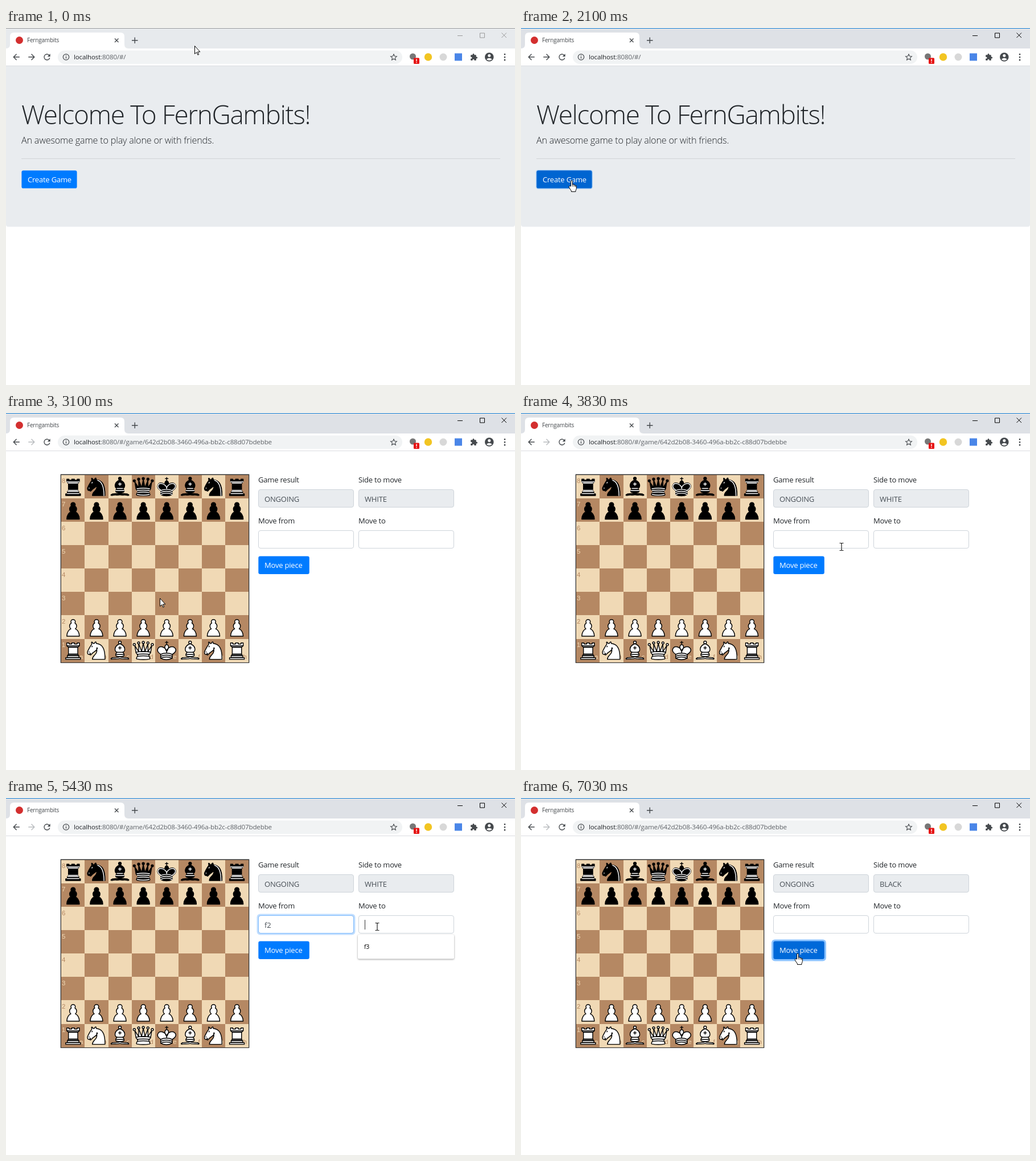
These frames come from a looping animation (894x627 px, 8000 ms). An HTML page:

```html
<!DOCTYPE html>
<html lang="en">
<head>
<meta charset="utf-8">
<title>Ferngambits</title>
<style>
html, body { margin: 0; width: 100%; height: 100%; overflow: hidden; background: #fff; }
svg { display: block; }
text { font: 13px "Open Sans", "Noto Sans", sans-serif; letter-spacing: -.2px; fill: #212529; white-space: pre; }
.light { font-weight: 300; }
.field { fill: #fff; stroke: #ced4da; }
.off { fill: #e9ecef; }
.value { fill: #495057; }
.on { fill: #fff; }
.coord { font: 11.5px "Liberation Sans", Arial, sans-serif; letter-spacing: 0; }
.drop { filter: drop-shadow(0 1px 1.5px rgba(0,0,0,.4)); }
.line { fill: none; stroke: #45494d; stroke-width: 1.4; }
</style>
</head>
<body>
<svg width="894" height="627" viewBox="0 0 894 627">
  <rect width="894" height="627" fill="#fff"/>
  <rect id="bar" width="894" height="36"/>
  <rect id="edge" width="894" height="1"/>
  <path d="M0 36q7 0 7-7V15q0-7 7-7H201q7 0 7 7V29q0 7 7 7z" fill="#fff"/>
  <circle cx="23.500" cy="21.500" r="6.500" fill="#d32f2f"/>
  <text x="37" y="25" style="font-size:10px;fill:#45494d">Ferngambits</text>
  <path class="line" d="M191 18.500l6.500 6.500m0-6.500l-6.500 6.500M221 21.700h10.500m-5.250-5.250v10.500"/>
  <path id="controls" fill="none" d="M793 13.500h9M832.500 9h8v8h-8zM870.500 8.500l8.500 8.500m0-8.500l-8.500 8.500"/>

  <g fill="#45494d">
    <path id="back" d="M20 11H7.800l5.600-5.600L12 4l-8 8 8 8 1.400-1.400L7.800 13H20z" transform="translate(9.400 42.400) scale(.72)"/>
    <path id="forward" d="M4 11H16.200l-5.600-5.600L12 4l8 8-8 8-1.400-1.400L16.200 13H4z" transform="translate(36.400 42.400) scale(.72)"/>
    <path d="M17.650 6.350A8 8 0 1 0 19.730 14h-2.080A6 6 0 1 1 12 6c1.660 0 3.140.69 4.220 1.780L13 11h7V4z" transform="translate(63.500 42.500) scale(.71)"/>
    <rect x="91" y="39.500" width="605" height="23.500" rx="11.750" fill="#f1f3f4"/>
    <path class="line" d="M100.300 51a5.200 5.200 0 1 0 10.400 0a5.200 5.200 0 1 0-10.400 0M105.500 50v3.800M105.500 47.800v1.300" style="stroke-width:1.200"/>
    <path class="line" d="M681 46l1.600 3.500 3.800.4-2.900 2.500.9 3.800-3.400-2-3.400 2 .9-3.800-2.900-2.500 3.800-.4z" style="stroke-width:1.100"/>
    <circle cx="714.500" cy="50" r="5.500" fill="#777"/>
    <rect x="716" y="52.500" width="10" height="10.500" rx="1.500" fill="#e60f0f"/>
    <path d="M721 54.500v4M721 59.800v1.400" stroke="#fff" stroke-width="1.500"/>
    <circle cx="741.500" cy="51" r="6.700" fill="#f2c522"/>
    <circle cx="768" cy="51" r="6.500" fill="#d8d8d8"/>
    <rect x="788" y="44.500" width="13" height="13" fill="#4a86e8"/>
    <path d="M20.500 11H19V7c0-1.100-.9-2-2-2h-4V3.500a2.500 2.500 0 0 0-5 0V5H4c-1.100 0-2 .9-2 2v3.800h1.500a2.700 2.700 0 0 1 0 5.400H2V20c0 1.100.9 2 2 2h3.800v-1.500a2.700 2.700 0 0 1 5.400 0V22H17c1.100 0 2-.9 2-2v-4h1.500a2.500 2.500 0 0 0 0-5z" transform="translate(815 44.500) scale(.57)"/>
    <circle cx="848.800" cy="51" r="7.800"/>
    <path d="M846.300 48.500a2.500 2.500 0 1 0 5 0a2.500 2.500 0 1 0-5 0M843.800 55q5-4.400 10 0-5 4-10 0z" fill="#fff"/>
    <path d="M876 45v2.600m0 2.300v2.600m0 2.300v2.600" stroke="#45494d" stroke-width="2.400"/>
  </g>
  <text x="119" y="55" style="font-size:11.600px;letter-spacing:-.16px">localhost<tspan id="path" fill="#5f6368"></tspan></text>
  <path d="M0 66.500h894" stroke="#dadce0"/>

  <g id="home">
    <path d="M0 67h894v278q0 4-4 4H4q-4 0-4-4z" fill="#e9ecef"/>
    <text class="light" x="27" y="169" style="font-size:46px;letter-spacing:-1.400px">Welcome To FernGambits!</text>
    <text class="light" x="27" y="203" style="font-size:16.200px;letter-spacing:-.2px">An awesome game to play alone or with friends.</text>
    <path d="M27 229.500h841" stroke="#000" stroke-opacity=".1"/>
    <rect id="createGlow" x="26" y="249" width="100" height="34" rx="4.500" fill="#007bff" opacity=".25"/>
    <rect id="create" x="27.400" y="250.300" width="97.200" height="31.300" rx="3.200"/>
    <text class="on" x="38" y="271">Create Game</text>
  </g>

  <g id="game">
    <g id="board"></g>
    <text x="443" y="122">Game result</text>
    <text x="619" y="122">Side to move</text>
    <rect class="field off" x="443.500" y="134.500" width="167" height="31" rx="3.500"/>
    <rect class="field off" x="619.500" y="134.500" width="167" height="31" rx="3.500"/>
    <text class="value" x="454" y="156">ONGOING</text>
    <text class="value" x="630" y="156" id="side"></text>
    <text x="443" y="194">Move from</text>
    <text x="619" y="194">Move to</text>
    <g id="fields"></g>
    <rect id="moveGlow" x="440" y="248.500" width="96" height="38" rx="6" fill="#007bff"/>
    <rect id="move" x="443.300" y="251.500" width="89.500" height="31.500" rx="3.200"/>
    <text class="on" x="454" y="272">Move piece</text>
    <g id="drops"></g>
  </g>

  <g id="pointer">
    <path id="arrow" d="M.5.5V14.500L3.700 11.600 5.900 16.300 7.700 15.500 5.600 10.900H9.900z" fill="#fff" stroke="#000"/>
    <g id="hand" fill="#fff" stroke="#000">
      <path d="M-1.400 10V1.500a1.400 1.400 0 0 1 2.800 0V7q2.500-1 2.700.8 2.200-.7 2.400.9 1.700-.3 1.800 1.300V13.500q0 2-1.400 4.300V19.500H-.6V18Q-2.800 15-4.700 11.700-4.800 8.700-2.500 9.800z"/>
      <path d="M1.400 7v3.500M4.100 8v2.800M6.500 9v2.200" fill="none" stroke-width=".8"/>
    </g>
    <path id="beam" d="M-3.500-6.500h2.500l1 1 1-1h2.500M0-5.500v11M-3.500 6.500h2.500l1-1 1 1h2.500" fill="none" stroke="#222" stroke-width="1.200"/>
  </g>
</svg>
<script>
const $ = id => document.getElementById(id);
const attr = (id, name, value) => $(id).setAttribute(name, value);
const show = (id, on) => { $(id).style.display = on ? '' : 'none'; };

// Each piece: [body, inner lines, extra lines on the black one]
const PIECES = {
  p: ['M22.5 9c-2.21 0-4 1.79-4 4 0 .89.29 1.71.78 2.38C17.33 16.500 16 18.590 16 21c0 2.030.94 3.840 2.410 5.030C15.410 27.090 11 31.580 11 39.500H34c0-7.920-4.410-12.410-7.410-13.470C28.060 24.840 29 23.030 29 21c0-2.410-1.330-4.500-3.280-5.620.49-.67.78-1.490.78-2.380 0-2.210-1.790-4-4-4z', '', ''],
  r: ['M9 39h27v-3H9zM12 36v-4h21v4zM12.5 32l1.5-2.5h17l1.500 2.500zM14 29.500V17h17v12.500zM14 17l-3-3h23l-3 3zM11 14V9h4v2h5V9h5v2h5V9h4v5z',
      'M12 35.500h21M13 31.500h19M14 29.500h17M14 16.500h17M11 14h23', ''],
  n: ['M22 10c10.500 1 16.500 8 16 29H15c0-9 10-6.500 8-21M24 18c.38 2.910-5.550 7.370-8 9-3 2-2.820 4.340-5 4-1.040-.94 1.410-3.040 0-3-1 0 .19 1.230-1 2-1 0-4 1-4-4 0-2 6-12 6-12s1.890-1.900 2-3.500c-.73-1-.5-2-.5-3 1-1 3 2.500 3 2.500h2s.78-2 2.500-3c1 0 1 3 1 3',
      'M8.800 25.500h.4M14.800 14.800l-.6 1.400', 'M24.600 11.200c7 2 11.500 9 11.600 28'],
  b: ['M9 36c3.390-.97 10.110.43 13.500-2 3.390 2.430 10.110 1.030 13.500 2 0 0 1.650.54 3 2-.68.97-1.650.99-3 .5-3.390-.97-10.110.46-13.500-1-3.390 1.460-10.110.03-13.500 1-1.350.49-2.320.47-3-.5 1.350-1.460 3-2 3-2zM15 32c2.500 2.500 12.500 2.500 15 0 .5-1.500 0-2 0-2 0-2.500-2.500-4-2.500-4 5.500-1.500 6-11.500-5-15.500-11 4-10.500 14-5 15.500 0 0-2.500 1.500-2.500 4 0 0-.5.5 0 2zM25 8a2.500 2.500 0 1 1-5 0 2.500 2.500 0 1 1 5 0z',
      'M17.500 26h10M15 30h15M22.500 15.500v5M20 18h5', ''],
  q: ['M9 26c8.500-1.500 21-1.500 27 0l2-12-7 11V11l-5.500 13.500-3-15-3 15-5.500-14V25L7 14zM9 26c0 2 1.500 2 2.500 4 1 1.500 1 1 .5 3.500-1.500 1-1.500 2.500-1.500 2.500-1.500 1.500.5 2.500.5 2.500 6.500 1 16.500 1 23 0 0 0 1.500-1 0-2.500 0 0 .5-1.500-1-2.500-.5-2.500-.5-2 .5-3.500 1-2 2.500-2 2.500-4-8.500-1.500-18.500-1.500-27 0z'
      + [[6, 12], [14, 9], [22.5, 8], [31, 9], [39, 12]].map(([x, y]) => `M${x - 2} ${y}a2 2 0 1 0 4 0a2 2 0 1 0-4 0z`).join(''),
      'M11.500 30c3.500-1 18.500-1 22 0M12 33.500c6-1 15-1 21 0', 'M11 26.500q11.500-2 23 0M11.500 37q11 2.500 22 0'],
  k: ['M22.500 11.600V6M20 8h5M22.500 25s4.500-7.500 3-10.500c0 0-1-2.500-3-2.500s-3 2.500-3 2.500c-1.500 3 3 10.500 3 10.500M11.500 37c5.500 3.500 15.500 3.500 21 0v-7s9-4.500 6-10.500c-4-6.500-13.500-3.500-16 4V27v-3.500c-3.500-7.500-13-10.500-16-4-3 6 5 10 5 10z',
      'M11.500 30c5.500-3 15.500-3 21 0M11.500 33.500c5.500-3 15.500-3 21 0M11.500 37c5.500-3 15.500-3 21 0', 'M32 29.500s8.500-4 6-9.650C34.150 14 25 18 22.500 24.500v2.100-2.100C20 18 9.900 14 7 19.850c-2.500 5.650 4.850 9 4.850 9']
};
const LIGHT = '#f0d9b5', DARK = '#b58863', CELL = 41.1, LEFT = 97.3, TOP = 108.8;

function piece(kind, black, x, y) {
  const [body, lines, extra] = PIECES[kind];
  return `<g transform="translate(${x - 1.05} ${y - 1.3}) scale(.96)" stroke-width="1.5" stroke-linejoin="round" stroke-linecap="round">
    <path d="${body}" fill="${black ? '#000' : '#fff'}" stroke="#000"/>
    <path d="${lines + (black ? extra : '')}" fill="none" stroke="${black ? '#fff' : '#000'}"/></g>`;
}

function drawBoard() {
  const back = 'rnbqkbnr', ranks = [back, 'pppppppp', '', '', '', '', 'pppppppp', back];
  let squares = '', labels = '', men = '';
  ranks.forEach((rank, r) => {
    for (let c = 0; c < 8; c++) {
      const x = LEFT + c * CELL, y = TOP + r * CELL;
      const [fill, ink] = (r + c) % 2 ? [DARK, LIGHT] : [LIGHT, DARK];
      squares += `<rect x="${x}" y="${y}" width="${CELL}" height="${CELL}" fill="${fill}" shape-rendering="crispEdges"/>`;
      if (!c) labels += `<text class="coord" x="${x + .8}" y="${y + 14.5}" style="fill:${ink}">${8 - r}</text>`;
      if (r === 7) labels += `<text class="coord" x="${x + 38}" y="${y + 35}" text-anchor="end" style="fill:${ink}">${'abcdefgh'[c]}</text>`;
      if (rank) men += piece(rank[c], r < 2, x, y);
    }
  });
  $('board').innerHTML = `<rect x="95.700" y="107.500" width="331.600" height="331.600" fill="#333"/>` + squares + labels + men;
}

function drawFields() {
  [['from', 443, 'f2'], ['to', 619, 'f3']].forEach(([id, x, hint]) => {
    $('fields').innerHTML += `<rect id="${id}Glow" x="${x - 2.5}" y="203.500" width="173" height="37" rx="6" fill="#007bff"/>
      <rect class="field" x="${x + .5}" y="206.500" width="167" height="31" rx="3.5"/>
      <rect id="${id}Edge" x="${x + .5}" y="206.500" width="167" height="31" rx="3.5" fill="none" stroke="#80bdff"/>
      <text class="value" id="${id}Text" x="${x + 11}" y="228"></text>
      <rect id="${id}Caret" y="214" width="1" height="17" fill="#333"/>`;
    $('drops').innerHTML += `<g id="${id}Drop"><rect class="drop" x="${x - 1}" y="240" width="169" height="42.500" rx="2" fill="#fff"/>
      <text x="${x + 10}" y="265" style="font-size:10.500px;fill:#000">${hint}</text></g>`;
  });
}

// time, x, y, pointer shape
const PATH = [
  [500, 331, 31, 'arrow'], [567, 346, 38, 'arrow'], [633, 390, 75, 'arrow'], [700, 400, 125, 'arrow'],
  [767, 378, 180, 'arrow'], [833, 330, 223, 'arrow'], [900, 273, 254, 'arrow'], [967, 205, 272, 'arrow'],
  [1100, 80, 280, 'arrow'], [1167, 36, 279, 'arrow'], [1233, 52, 275, 'arrow'], [1300, 84, 269, 'hand'],
  [1367, 89, 268, 'hand'], [2160, 88, 268, 'arrow'], [2833, 90, 270, 'arrow'], [2967, 150, 305, 'arrow'],
  [3167, 330, 335, 'arrow'], [3433, 585, 312, 'arrow'], [3567, 643, 290, 'arrow'], [3633, 640, 283, 'arrow'],
  [3700, 620, 266, 'arrow'], [3767, 592, 248, 'arrow'], [3833, 563, 235, 'beam'], [3967, 525, 226, 'beam'],
  [4033, 518, 225, 'beam'], [5033, 518, 225, 'beam'], [5233, 595, 224, 'beam'], [5300, 616, 225, 'arrow'],
  [5367, 640, 225, 'beam'], [5433, 652, 225.5, 'beam'], [6233, 652, 225.5, 'beam'], [6367, 615, 240, 'arrow'],
  [6567, 535, 264, 'arrow'], [6633, 508, 270, 'hand'], [6767, 486, 273, 'hand'], [8000, 486, 273, 'hand']
];

const ramp = (t, a, b) => Math.min(1, Math.max(0, (t - a) / (b - a)));
const within = (t, a, b) => t >= a && t < b;
const blue = k => `rgb(0 ${123 - 18 * k} ${255 - 38 * k})`;

function movePointer(t) {
  let i = 0;
  while (i < PATH.length - 2 && PATH[i + 1][0] <= t + 1) i++;
  const [t0, x0, y0, kind] = PATH[i], [t1, x1, y1] = PATH[i + 1];
  // long gaps are rests, not glides
  const k = t1 - t0 > 500 ? 0 : ramp(t, t0, t1);
  const x = Math.round(x0 + (x1 - x0) * k), y = Math.round(y0 + (y1 - y0) * k);
  attr('pointer', 'transform', `translate(${x} ${y})`);
  ['arrow', 'hand', 'beam'].forEach(p => show(p, p === kind));
}

function setField(id, focus, text, caret, drop) {
  attr(id + 'Glow', 'opacity', focus * .25);
  attr(id + 'Edge', 'opacity', focus);
  $(id + 'Text').textContent = text;
  const x = id === 'from' ? 454 : 630;
  attr(id + 'Caret', 'x', x + [0, 4, 12][text.length]);
  show(id + 'Caret', caret);
  show(id + 'Drop', drop);
}

function render(now) {
  const step = 200 / 3, half = step / 2;
  const t = half + Math.floor((now % 8000 + 7 - half) / step) * step + .5;
  const active = t > 2030, game = t > 2160, done = t > 6960;

  attr('bar', 'fill', active ? '#dee1e6' : '#e7eaed');
  attr('edge', 'fill', active ? '#1883d7' : '#9a9c9e');
  attr('controls', 'stroke', active ? '#000' : '#999');
  attr('forward', 'fill', game ? '#b9bcbf' : '#45494d');
  $('path').textContent = ':8080/#/' + (game ? 'game/642d2b08-3460-496a-bb2c-c88d07bdebbe' : '');
  show('home', !game);
  show('game', game);

  attr('create', 'fill', t > 2090 ? '#0065d1' : blue(ramp(t, 1300, 1433)));
  show('createGlow', t > 2090);

  $('side').textContent = done ? 'BLACK' : 'WHITE';
  setField('from', ramp(t, 4033, 4233) - ramp(t, 5433, 5567),
    done || t < 4695 ? '' : t < 5030 ? 'f' : 'f2',
    within(t, 4030, 4630) || within(t, 4695, 5430), within(t, 4095, 5030));
  setField('to', ramp(t, 5433, 5567) - ramp(t, 6833, 6967),
    done || t < 5695 ? '' : t < 6230 ? 'f' : 'f3',
    within(t, 5430, 6830), within(t, 5430, 6230));
  attr('move', 'fill', blue(ramp(t, 6633, 6767)));
  attr('moveGlow', 'opacity', ramp(t, 6833, 6967) * .45);
  movePointer(t);
}

drawBoard();
drawFields();
const start = performance.now();
function tick() {
  render(performance.now() - start);
  requestAnimationFrame(tick);
}
tick();
</script>
</body>
</html>
```
